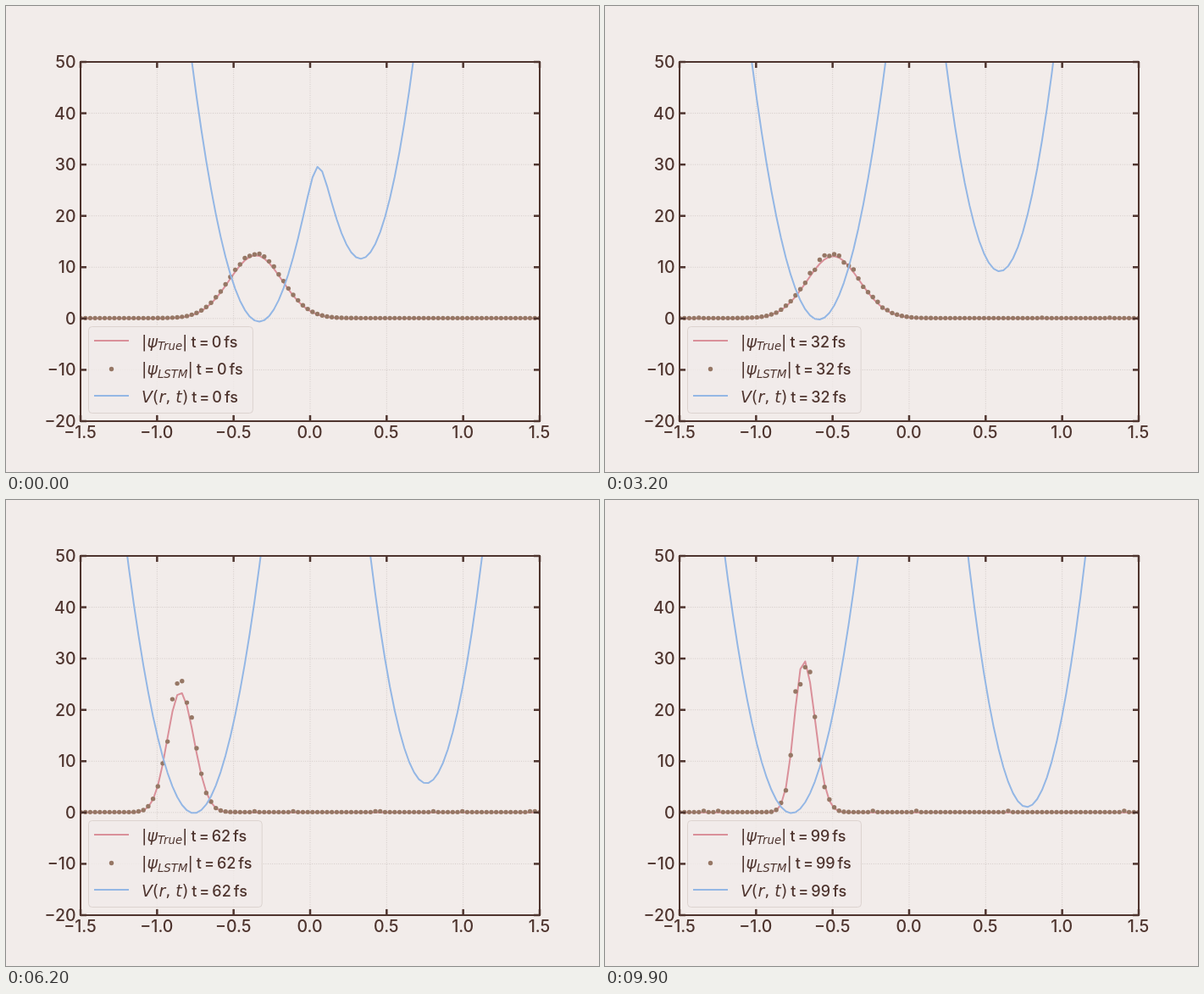
These frames come from a looping animation (700x550 px, 10000 ms). An HTML page with a canvas:

```html
<!DOCTYPE html>
<html lang="en">
<head>
<meta charset="utf-8">
<title>Wave packet in a moving double well</title>
<style>
html, body { margin: 0; width: 100%; height: 100%; overflow: hidden; background: #f2ecea; }
canvas { display: block; width: 700px; height: 550px; }
</style>
</head>
<body>
<canvas id="plot" width="700" height="550"></canvas>
<script>
const ctx = document.getElementById('plot').getContext('2d');
const BG = '#f2ecea', INK = '#4e342e', ROSE = '#da909a', DOT = '#967765', BLUE = '#94b7e5';
const LABEL = '500 19.5px Inter, sans-serif';
const TEXT = '500 18px Inter, sans-serif';
const BOX = { l: 88, t: 66, r: 630, b: 490 };
const COUNT = 96, COUPLING = 10, STEPS = 100, STEP_MS = 100;

const px = x => 359 + x * (BOX.r - BOX.l) / 3;
const py = y => BOX.b - (y + 20) * (BOX.b - BOX.t) / 70;
const grid = Array.from({ length: COUNT }, (_, i) => -1.5 + 3 * i / (COUNT - 1));

// Key points of the packet: time in fs, breathing phase, swing phase
const KEYS = [
  [0, 0, 1.78], [11, 5.31, 7.21], [24, 11.94, 15.38], [40, 19.29, 22.31],
  [62, 30.25, 34.24], [82, 39.62, 42.61], [99, 48.5, 50.84]
];

function phases(t) {
  const i = Math.max(1, KEYS.findIndex(k => k[0] >= t));
  const a = KEYS[i - 1], b = KEYS[i], u = (t - a[0]) / (b[0] - a[0]);
  return [1, 2].map(c => a[c] + (b[c] - a[c]) * u);
}

function random(a, b) {
  const s = Math.sin(a * 127.1 + b * 311.7 + 5.3) * 43758.5453;
  return s - Math.floor(s);
}

// Distance of each well from the centre, and height of the right one
const shift = t => .4135 + .381 * Math.cos(.02165 * (t - 82));
const lift = t => 4.6 - 10.24 * Math.sin(.0124 * (t - 72));

// Lower state of two coupled parabolas
function potential(t) {
  const r = shift(t), d = lift(t);
  return grid.map(x => {
    const a = 264 * (x + r) ** 2, b = 333 * (x - r) ** 2 + d;
    return (a + b) / 2 - Math.hypot((a - b) / 2, COUPLING);
  });
}

// Gaussian that swings and breathes in the left well, slowly growing lopsided
function packet(t) {
  const [breath, swing] = phases(t);
  const mid = .095 * Math.cos(swing) - shift(t);
  const width = Math.sqrt(.0036 + .026 * Math.cos(breath) ** 2);
  const height = (2.12 - .0011 * t) / width, skew = .1 * (t / 99) ** 2;
  return grid.map(x => {
    const s = width * (x < mid ? 1 - skew : 1 + skew);
    return height * Math.exp(-(((x - mid) / s) ** 2) / 2);
  });
}

// The packet with an error that grows with time
function prediction(t, wave) {
  const spread = .015 + .14 * t / 99;
  return wave.map((y, i) => {
    const bump = random(i, t) > .93 ? .25 * t / 99 : 0;
    return y * (1.02 + spread * (2 * random(t, i) - 1)) + .08 + bump;
  });
}

function segment(x1, y1, x2, y2) {
  ctx.beginPath();
  ctx.moveTo(x1, y1);
  ctx.lineTo(x2, y2);
  ctx.stroke();
}

function curve(values, color) {
  ctx.strokeStyle = color;
  ctx.lineWidth = 2;
  ctx.lineJoin = 'round';
  ctx.beginPath();
  values.forEach((y, i) => ctx.lineTo(px(grid[i]), py(y)));
  ctx.stroke();
}

function dot(x, y) {
  ctx.beginPath();
  ctx.arc(x, y, 2.7, 0, 7);
  ctx.fill();
}

const range = (from, to, step) =>
  Array.from({ length: Math.round((to - from) / step) + 1 }, (_, i) => from + i * step);
const xTicks = range(-1.5, 1.5, .5), yTicks = range(-20, 50, 10);

function drawGrid() {
  ctx.strokeStyle = '#d3cbc8';
  ctx.lineWidth = 1;
  ctx.setLineDash([1, 1.6]);
  for (const x of xTicks.slice(1, -1)) segment(px(x), BOX.t, px(x), BOX.b);
  for (const y of yTicks.slice(1, -1)) segment(BOX.l, py(y), BOX.r, py(y));
  ctx.setLineDash([]);
}

function drawAxes() {
  ctx.strokeStyle = ctx.fillStyle = INK;
  ctx.lineWidth = 2;
  ctx.strokeRect(BOX.l, BOX.t, BOX.r - BOX.l, BOX.b - BOX.t);
  ctx.lineWidth = 2.5;
  ctx.font = LABEL;
  const name = s => s.replace('-', '\u2212');
  ctx.textAlign = 'center';
  for (const x of xTicks) {
    segment(px(x), BOX.t, px(x), BOX.t + 7);
    segment(px(x), BOX.b, px(x), BOX.b - 7);
    ctx.fillText(name(x.toFixed(1)), px(x) - .5, 510);
  }
  ctx.textAlign = 'right';
  for (const y of yTicks) {
    segment(BOX.l, py(y), BOX.l + 7, py(y));
    segment(BOX.r, py(y), BOX.r - 7, py(y));
    ctx.fillText(name(String(y)), 82.5, py(y) + 7);
  }
  ctx.textAlign = 'left';
}

// Math text: "_" starts a subscript, brackets and commas stay upright
const LEGEND = ['|ψ_True|', '|ψ_LSTM|', 'V(r, t)'];

function writeMath(text, x, y) {
  let sub = false;
  for (const part of text.match(/[A-Za-zψ]+|[^A-Za-zψ]/g)) {
    if (part === '_') { sub = true; continue; }
    const style = /[A-Za-zψ]/.test(part) ? 'italic' : 'normal';
    ctx.font = `${style} ${sub ? 13.3 : 19}px "DejaVu Sans", sans-serif`;
    ctx.fillText(part, x, y + (sub ? 3.5 : 0));
    x += ctx.measureText(part).width;
    sub = false;
  }
  return x;
}

function drawLegend(t) {
  const words = ['t', '=', String(t), 'fs'], gap = 3;
  ctx.font = TEXT;
  const length = words.reduce((sum, w) => sum + ctx.measureText(w).width + gap, -gap);
  ctx.fillStyle = 'rgba(242,236,234,.8)';
  ctx.strokeStyle = '#dcd3cf';
  ctx.lineWidth = 1;
  ctx.beginPath();
  ctx.roundRect(97.5, 378.5, 139 + length, 102, 4);
  ctx.fill();
  ctx.stroke();

  ctx.lineWidth = 2;
  ctx.strokeStyle = ROSE;
  segment(104, 395, 145, 395);
  ctx.strokeStyle = BLUE;
  segment(104, 460, 145, 460);
  ctx.fillStyle = DOT;
  dot(124.5, 428.5);

  ctx.fillStyle = INK;
  LEGEND.forEach((math, i) => {
    const y = 402.5 + 32.5 * i;
    let x = writeMath(math, 160, y) + 4;
    ctx.font = TEXT;
    for (const w of words) {
      ctx.fillText(w, x, y);
      x += ctx.measureText(w).width + gap;
    }
  });
}

function draw(t) {
  ctx.fillStyle = BG;
  ctx.fillRect(0, 0, 700, 550);
  drawGrid();
  ctx.save();
  ctx.beginPath();
  ctx.rect(BOX.l, BOX.t, BOX.r - BOX.l, BOX.b - BOX.t);
  ctx.clip();
  const wave = packet(t);
  curve(wave, ROSE);
  ctx.fillStyle = DOT;
  prediction(t, wave).forEach((y, i) => dot(px(grid[i]), py(y)));
  curve(potential(t), BLUE);
  ctx.restore();
  drawAxes();
  drawLegend(t);
}

const start = performance.now();
let shown = -1;
function tick() {
  const t = Math.floor(Math.max(0, performance.now() - start) / STEP_MS) % STEPS;
  if (t !== shown) draw(shown = t);
  requestAnimationFrame(tick);
}
tick();
</script>
</body>
</html>
```
